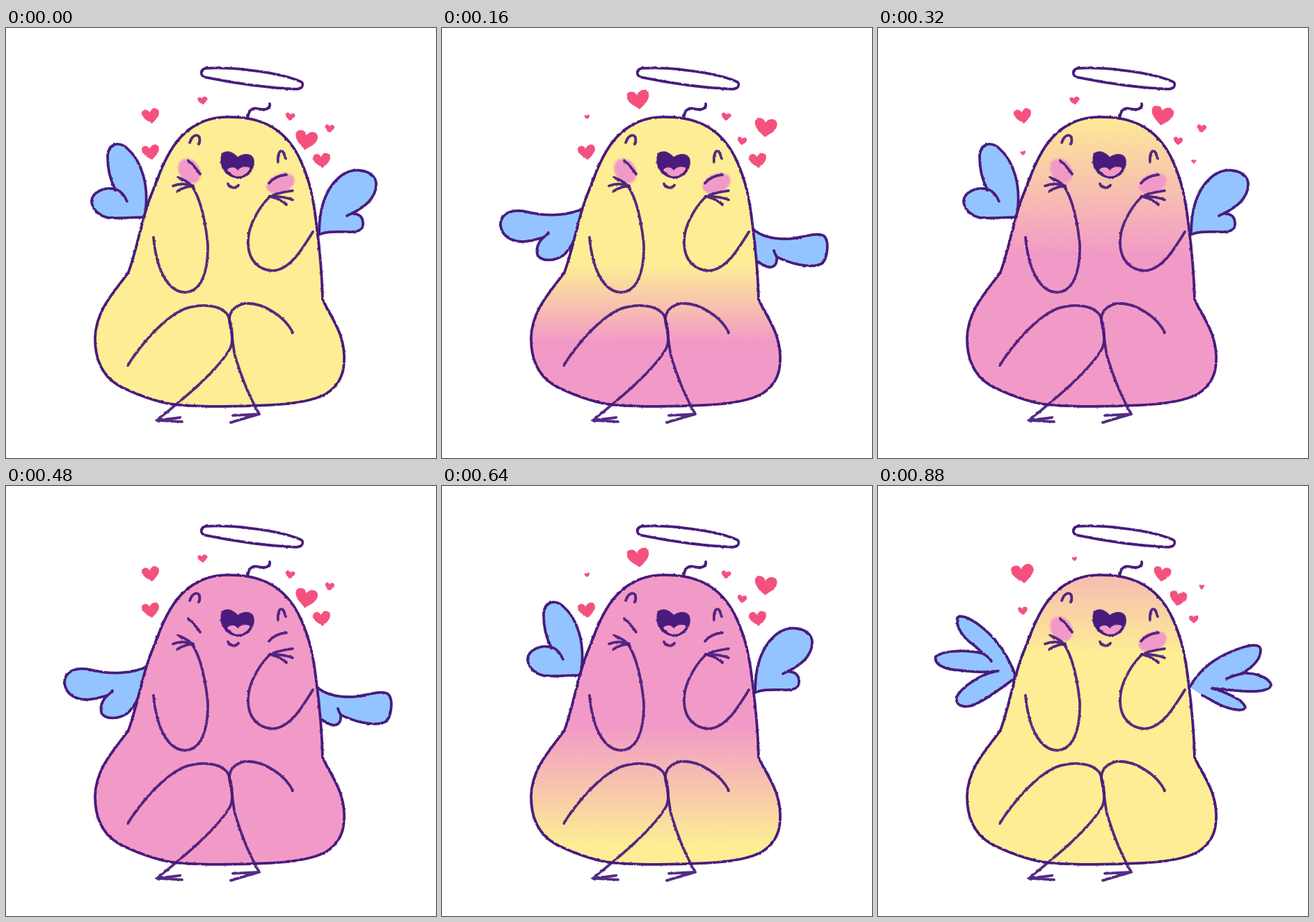
Write an HTML page that moves like this. It is 618 px wide and 618 px high and loops after 960 ms.

```html
<!DOCTYPE html>
<html lang="en">
<head>
<meta charset="utf-8">
<title>Cupid pear</title>
<style>
  html, body { margin: 0; width: 100%; height: 100%; overflow: hidden; background: #fff; }
  svg { display: block; width: 100vw; height: 100vh; }
  .line { fill: none; stroke: #481b7c; stroke-width: 3.8; stroke-linecap: round; stroke-linejoin: round; }
  .soft { stroke-opacity: .93; }
  .wing { fill: #94c4ff; }
  .inner { fill: none; }
  .mouth { fill: #481b7c; stroke-width: 2.6; }
  .heart { fill: #f4517e; }
  .pink { fill: #f29ac7; }
  .blush { filter: blur(1.2px); }
</style>
</head>
<body>
<svg viewBox="0 0 618 618">
  <defs>
    <filter id="crayon" filterUnits="userSpaceOnUse" x="0" y="0" width="618" height="618" color-interpolation-filters="sRGB">
      <feTurbulence type="fractalNoise" baseFrequency=".22" numOctaves="2" seed="4"/>
      <feDisplacementMap in="SourceGraphic" scale="2.4" xChannelSelector="R" yChannelSelector="G"/>
    </filter>
    <linearGradient id="skin" gradientUnits="userSpaceOnUse" x1="0" x2="0" y1="700" y2="800">
      <stop offset="0"/><stop offset="1"/>
    </linearGradient>
  </defs>
  <g filter="url(#crayon)" transform="translate(0 .9)">
    <g id="wings" class="line"></g>
    <g class="line">
      <path fill="url(#skin)" d="M318 127C285 127 262 142 245 163C225 190 217 220 207 243C195 275 188 318 176 350C160 374 129 402 128 445C128 490 150 508 170 517C200 531 225 539 250 541C290 544 340 543 380 541C420 539 445 533 460 525C480 511 487 495 486 470C485 435 465 412 455 389C454 345 450 310 446 280C442 245 437 220 424 191C412 163 395 147 374 137C355 129 340 127 318 127Z"/>
      <!-- halo and hair -->
      <path d="M288 57C320 55 350 59 380 64C400 68 418 73 425 77C429 82 424 87 417 87C375 85 330 79 287 70C278 68 279 58 288 57Z"/>
      <path d="M347 129C349 117 354 113 361 115C369 117 381 117 379 108"/>
    </g>
    <g class="pink blush">
      <ellipse rx="15" ry="19" transform="translate(263.5 204.5) rotate(-32)"/>
      <ellipse rx="21" ry="13.5" transform="translate(394.5 222.5) rotate(-22)"/>
    </g>
    <g class="line soft">
      <!-- face -->
      <path d="M264 164C267 153 276 150 278 157C279 161 278 164 277 166M391 192C390 180 394 174 397 176C400 179 401 184 402 187"/>
      <path d="M262 190C268 195 274 202 279 209M378 222C384 215 392 211 403 210M319 223C321 229 331 231 334 225"/>
      <path class="mouth" d="M310 184C311 178 316 177 322 178C328 180 331 184 333 186C337 183 343 180 350 182C356 184 357 193 354 200C350 210 340 215 332 214C318 213 307 198 310 184Z"/>
      <!-- arms -->
      <path d="M247 214C255 217 262 220 267 226M240 226C250 222 260 223 268 226M246 234C253 229 260 227 268 226"/>
      <path d="M267 226C280 245 287 280 290 310C291 350 280 378 258 379C232 379 216 345 212 300"/>
      <path d="M412 233C400 234 390 237 379 241C390 241 402 242 412 246M379 241C390 244 398 248 403 253"/>
      <path d="M379 241C360 262 347 285 348 310C349 335 365 347 383 348C408 347 425 318 441 292"/>
      <!-- legs -->
      <path d="M175 484C195 452 228 415 256 403C280 395 308 396 319 412C326 430 327 450 322 460C305 490 260 528 217 563L250 559M217 563L253 565"/>
      <path d="M412 437C402 415 370 393 343 395C325 399 318 412 322 425C325 440 326 455 329 470C338 500 350 530 364 554L326 556M364 554L323 566"/>
    </g>
    <path class="pink" d="M318 203C322 198 330 198 333 204C336 199 344 197 351 200C348 208 340 212.5 332 212.5C326 211 321 207 318 203Z"/>
    <g id="hearts" class="heart"></g>
  </g>
</svg>
<script>
const STEP = 80, STEPS = 12;
const YELLOW = '#fded94', PINK = '#f29ac7';
const $ = id => document.getElementById(id);
const add = (parent, tag, attrs) => {
  const el = document.createElementNS('http://www.w3.org/2000/svg', tag);
  for (const key in attrs) el.setAttribute(key, attrs[key]);
  return parent.appendChild(el);
};

// Wing poses: pairs of [outline, inner creases], left then right
const poses = [
  [ // raised
    ['M200 266C206 225 195 190 174 172C161 161 147 166 146 183C146 200 150 218 157 231C142 227 124 234 123 248C124 262 138 272 152 272C170 273 185 271 197 271Z',
     'M157 231C164 232 170 240 174 248'],
    ['M450 295C450 255 462 225 485 209C505 198 530 205 532 222C533 243 515 258 493 267C503 264 513 268 513 279C514 290 505 293 490 292C475 292 462 291 450 296Z',
     'M493 267L490 269']
  ],
  [ // fanning down
    ['M197 265C178 255 171 237 163 218C155 202 145 193 136 196C128 203 132 222 139 235C142 242 145 246 148 251C132 242 112 236 104 243C101 254 110 268 125 273C131 275 138 276 144 276C130 279 117 285 117 293C119 303 140 304 158 299C175 293 186 282 197 271Z',
     'M148 251C155 256 160 261 167 263M125 273C140 277 152 277 166 275'],
    ['M446 289C462 288 472 272 482 255C492 236 504 222 515 223C526 227 521 248 511 263C526 252 543 242 553 248C560 258 540 282 518 294C527 296 528 310 518 317C500 322 465 318 446 294Z',
     'M511 263C505 270 497 275 489 278M518 294C510 297 503 300 496 301']
  ],
  [ // lowered
    ['M205 258C180 269 150 270 125 264C103 258 85 264 84 281C85 298 100 307 118 306C130 305 138 302 146 300C138 307 134 318 138 327C146 335 162 334 174 326C184 318 188 308 192 300L205 300Z',
     'M146 300L153 294'],
    ['M446 287C460 301 480 303 500 302C518 300 540 292 549 298C557 306 554 328 547 337C535 345 505 340 481 328C482 338 478 343 470 343C462 341 456 336 448 331Z',
     'M481 328C479 325 478 322 477 319']
  ],
  [ // fanning up
    ['M197 270C188 244 168 216 148 201C133 189 118 183 114 189C112 202 122 217 138 228C143 232 147 236 151 240C128 234 95 235 83 244C80 256 96 263 118 264C138 267 156 267 173 265C150 268 122 286 113 302C111 314 121 318 134 315C155 307 176 290 196 276Z',
     'M151 240C156 243 161 247 163 251'],
    ['M448 288C460 266 482 247 508 237C527 229 548 223 550 234C550 248 538 260 522 269C540 266 562 274 565 285C562 296 535 295 512 293C500 292 490 290 480 290C496 294 526 306 528 318C522 325 500 318 486 311C478 306 472 303 466 300',
     'M522 269C514 271 507 273 501 276']
  ]
].map(pair => {
  const g = add($('wings'), 'g', {});
  for (const [outline, creases] of pair) {
    add(g, 'path', { class: 'wing', d: outline });
    add(g, 'path', { class: 'inner', d: creases });
  }
  return g;
});

// Hearts: x, y, tilt, step of greatest size
const HEART = 'M0 11.5C-6 6 -16 0 -16 -9C-16 -17 -4 -18 -1 -9C3 -18 16 -17 16 -8C16 1 6 7 0 11.5Z';
const SIZES = [1, .78, .42, .23];
const hearts = [
  [208.5, 125, -9, 5], [208.5, 177, -9, 1], [282.5, 102, -8, 2], [408, 125, 9, 4],
  [431, 160, 9, 0], [465, 142, 5, 2], [454, 189, -5, 1]
].map(([x, y, tilt, peak]) => ({ x, y, tilt, peak, el: add($('hearts'), 'path', { d: HEART }) }));

// Colour change from top to bottom of the body, per step
const bands = [
  [700, 800], [430, 560], [340, 450], [230, 385], [120, 325], [50, 230],
  [700, 800], [430, 600], [345, 515], [190, 375], [120, 310], [50, 240]
];
const skin = $('skin'), [upper, lower] = skin.children;

function draw(step) {
  poses.forEach((g, i) => g.setAttribute('visibility', i === step % 4 ? 'visible' : 'hidden'));

  for (const { x, y, tilt, peak, el } of hearts) {
    const gap = (step - peak + STEPS) % 6;
    const size = SIZES[Math.min(gap, 6 - gap)];
    el.setAttribute('transform', `translate(${x} ${y + 2.5}) rotate(${tilt}) scale(${size})`);
  }

  const toPink = step < 6;
  skin.setAttribute('y1', bands[step][0]);
  skin.setAttribute('y2', bands[step][1]);
  upper.setAttribute('stop-color', toPink ? YELLOW : PINK);
  lower.setAttribute('stop-color', toPink ? PINK : YELLOW);
}

let shown = -1;
function tick() {
  const step = Math.floor(performance.now() / STEP) % STEPS;
  if (step !== shown) draw(shown = step);
  requestAnimationFrame(tick);
}
tick();
</script>
</body>
</html>
```
